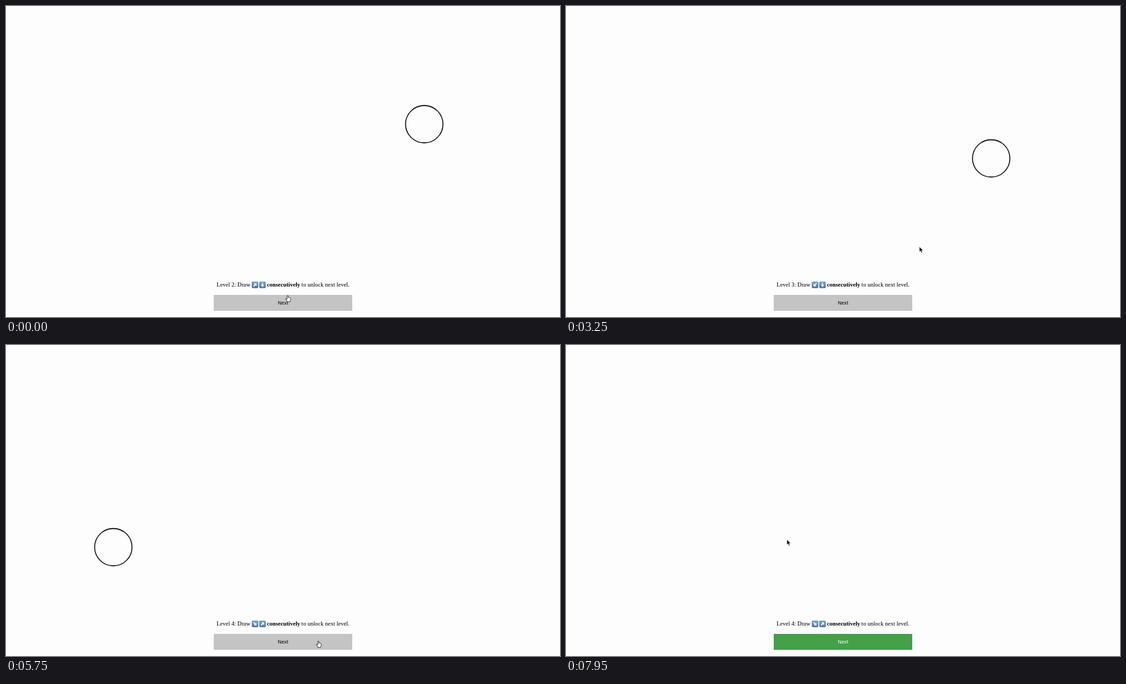
An HTML page for the animation above (8 s loop, 800x450 px).

```html
<!DOCTYPE html>
<html lang="en">
<head>
<meta charset="utf-8">
<title>Draw to unlock</title>
<style>
  html, body { margin: 0; width: 100%; height: 100%; overflow: hidden; background: #fdfdfd; }
  svg { display: block; width: 800px; height: 450px; }
  .hint { font: 8.47px "Liberation Serif", "Times New Roman", serif; }
  .hint .strong { font-weight: bold; }
  #next { font: 7.3px "Liberation Sans", Arial, sans-serif; text-anchor: middle; }
</style>
</head>
<body>
<svg viewBox="0 0 800 450">
  <defs>
    <linearGradient id="key" x2="0" y2="1">
      <stop offset="0" stop-color="#7ba3c8"/>
      <stop offset="1" stop-color="#486f9b"/>
    </linearGradient>
    <g id="tile">
      <rect x="-4.7" y="-4.7" width="9.4" height="9.4" rx="1.4" fill="url(#key)"/>
    </g>
    <path id="arrow" d="M-3 -.8H0V-2.8L3.2 0L0 2.8V.8H-3Z" fill="#fff"/>
  </defs>
  <rect width="800" height="450" fill="#fdfdfd"/>
  <polyline id="line" fill="none" stroke="#000" stroke-width="3" stroke-linecap="round" stroke-linejoin="round"/>
  <circle id="ring" r="27" stroke="#000" stroke-width="1.3"/>
  <g class="hint">
    <text id="level" x="304" y="406.4"></text>
    <text class="strong" x="376.8" y="406.4">consecutively</text>
    <text x="426.8" y="406.4">to unlock next level.</text>
  </g>
  <g transform="translate(359.6 403.5)"><use href="#tile"/><use id="arrowA" href="#arrow"/></g>
  <g transform="translate(370.4 403.5)"><use href="#tile"/><use id="arrowB" href="#arrow"/></g>
  <rect id="button" x="300" y="418" width="200" height="23"/>
  <text id="next" x="400" y="432.4">Next</text>
  <path id="pointer" d="M0 0V7.7L1.7 6.1L3 9L4.3 8.4L3.1 5.6H5.4Z" fill="#000" stroke="#fff" stroke-width=".5"/>
  <path id="hand" d="M-.8 .8Q0 -.3 .7 .8V3.3Q1.5 2.8 2 3.6Q2.8 3.2 3.2 4Q4.4 3.8 4.3 5.2Q4.3 7.4 3.3 8.4V9.6H-.9V8.6L-3 5.6Q-2.7 4.5 -1.6 5.4L-.8 6.1Z"
    fill="#fff" stroke="#000" stroke-width=".65" stroke-linejoin="round"/>
</svg>
<script>
const LOOP = 8000, PEN_LAG = 55, FADE = 200;
const byId = id => document.getElementById(id);
const [line, ring, level, arrowA, arrowB, button, next, pointer, hand] =
  ["line", "ring", "level", "arrowA", "arrowB", "button", "next", "pointer", "hand"].map(byId);

// Each level: first moment, ring centre, arrow angles, pen down, pen up.
const levels = [
  { n: 2, from: 0, x: 604, y: 171, angles: [-45, 90], press: 560, release: 1800 },
  { n: 3, from: 2600, x: 614, y: 220.5, angles: [135, 90], press: 3690, release: 5200 },
  { n: 4, from: 5750, x: 155, y: 292.5, angles: [45, -45], press: 6800, release: 7950 }
];

// Cursor moves: start, end, target x, target y, sideways bow.
const home = [406.8, 418.4];
const moves = [
  [0, 600, 606, 174, 0],
  [850, 1150, 731.5, 81, 4],
  [1250, 1622, 723.5, 178, 1.3],
  [2100, 2350, 467.3, 418.8, 0],
  [2400, 2900, 445, 432.5, 0],
  [2950, 3650, 610, 219.5, 0],
  [4050, 4500, 530, 272, 0],
  [4600, 4980, 534, 357, -1.5],
  [5220, 5500, 451, 428, 0],
  [6250, 6798, 158, 292, 0],
  [7100, 7430, 239, 351, 0],
  [7480, 7800, 319, 281.5, 2]
];

const clamp = v => Math.max(0, Math.min(1, v));
const smooth = u => u * u * (3 - 2 * u);

function cursorAt(t) {
  let [x, y] = home;
  for (const [start, end, tx, ty, bow] of moves) {
    if (t <= start) break;
    const k = smooth(clamp((t - start) / (end - start)));
    const dx = tx - x, dy = ty - y;
    const side = bow * 4 * k * (1 - k) / Math.hypot(dx, dy);
    x += dx * k - dy * side;
    y += dy * k + dx * side;
  }
  return [x, y];
}

function strokePoints(from, to) {
  const points = [];
  for (let t = from; t < to; t += 15) points.push(cursorAt(t));
  points.push(cursorAt(to));
  return points.map(p => p.map(v => v.toFixed(2)).join()).join(" ");
}

const show = (el, on) => el.setAttribute("visibility", on ? "visible" : "hidden");

function render(t) {
  const stage = levels.findLast(l => t >= l.from);
  const done = t >= stage.release;
  const penTime = t - PEN_LAG;

  level.textContent = `Level ${stage.n}: Draw`;
  arrowA.setAttribute("transform", `rotate(${stage.angles[0]})`);
  arrowB.setAttribute("transform", `rotate(${stage.angles[1]})`);

  show(ring, !done);
  ring.setAttribute("cx", stage.x);
  ring.setAttribute("cy", stage.y);
  const grey = Math.round(253 - 138 * clamp((t - stage.press) / FADE));
  ring.setAttribute("fill", `rgb(${grey},${grey},${grey})`);

  const drawing = !done && penTime > stage.press + FADE;
  show(line, drawing);
  if (drawing) line.setAttribute("points", strokePoints(stage.press + FADE, penTime));

  button.setAttribute("fill", done ? "#43a146" : "#c4c4c4");
  next.setAttribute("fill", done ? "#fff" : "#000");

  const [x, y] = cursorAt(t);
  const overButton = x >= 300 && x <= 500 && y >= 418 && y <= 441;
  show(hand, overButton);
  show(pointer, !overButton);
  (overButton ? hand : pointer).setAttribute("transform", `translate(${x} ${y})`);
}

function tick() {
  render(performance.now() % LOOP);
  requestAnimationFrame(tick);
}
tick();
</script>
</body>
</html>
```
